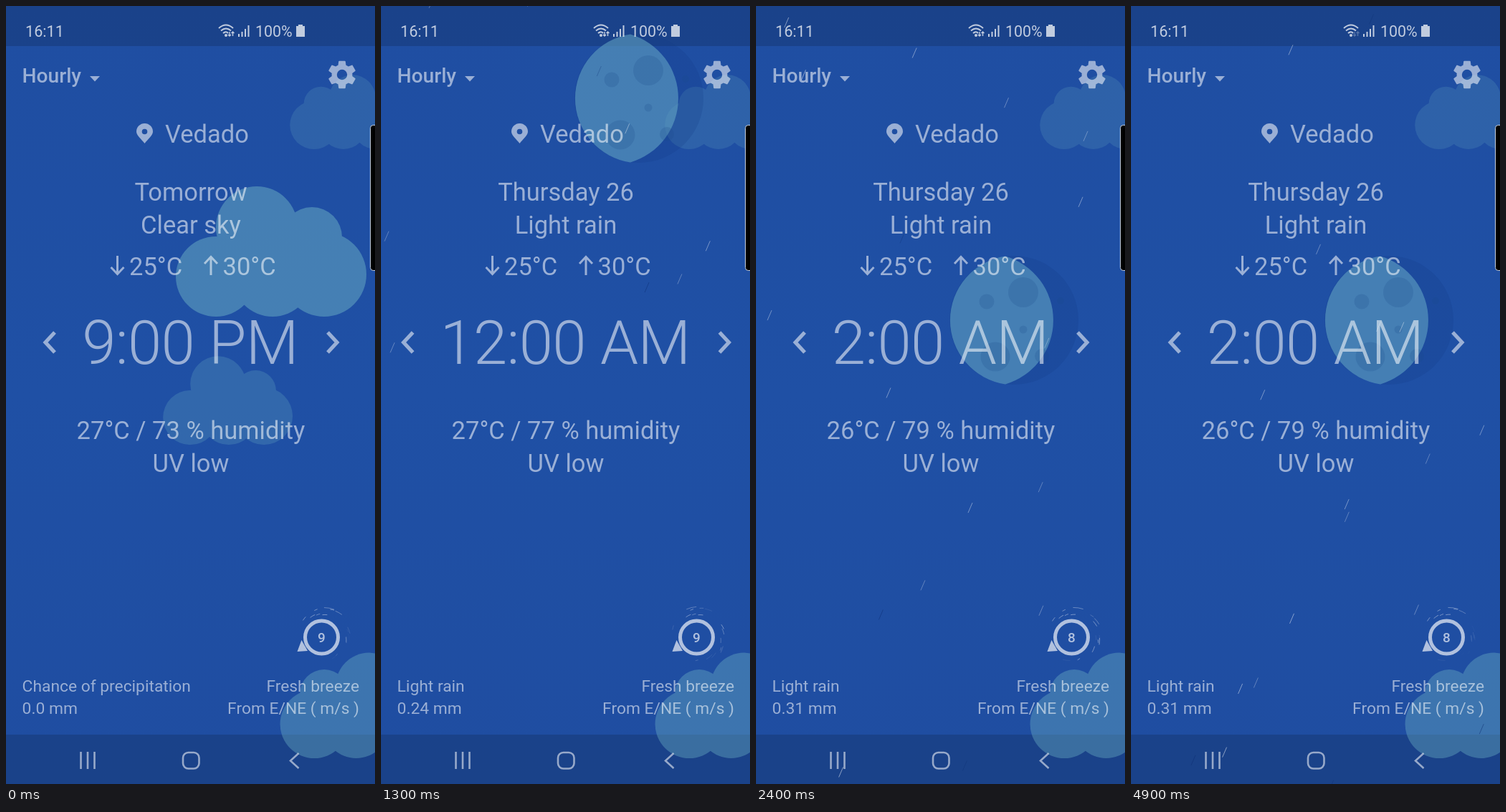
An HTML page for the animation above (5 s loop, 515x1087 px).

```html
<!DOCTYPE html>
<html lang="en">
<head>
<meta charset="utf-8">
<title>Hourly weather</title>
<style>
  html, body { margin: 0; width: 100%; height: 100%; overflow: hidden; background: #1f4fa3; }
  svg { display: block; width: 100%; height: 100%; }
  text { font-family: Roboto, sans-serif; fill: #fff; }
  .mid { text-anchor: middle; }
  .end { text-anchor: end; }
  .main { font-size: 34.5px; }
  .small { font-size: 22.8px; }
  .line { fill: none; stroke: #fff; }
  #clock { font-size: 85.2px; font-weight: 300; letter-spacing: -.7px; }
</style>
</head>
<body>
<svg viewBox="0 0 515 1087" preserveAspectRatio="none">
  <defs>
    <linearGradient id="sky" x2="0" y2="1">
      <stop stop-color="#1f4ea2"/>
      <stop offset=".5" stop-color="#1f50a5"/>
      <stop offset="1" stop-color="#1f4da1"/>
    </linearGradient>
    <g id="cloud" fill="#6cb0c4">
      <circle cx="293" cy="378" r="56"/>
      <circle cx="350" cy="309" r="57"/>
      <circle cx="427" cy="323" r="42"/>
      <circle cx="372" cy="378" r="56"/>
      <circle cx="444" cy="375" r="59"/>
    </g>
  </defs>

  <rect width="515" height="1087" fill="url(#sky)"/>
  <rect width="515" height="56" opacity=".15"/>
  <rect y="1018" width="515" height="69" opacity=".15"/>

  <g opacity=".2"><use href="#cloud" transform="translate(683 -47.4) scale(-.57 .57)"/></g>
  <g opacity=".4"><use href="#cloud" transform="translate(790 699.5) scale(-.81 .81)"/></g>
  <g id="bigCloud" opacity=".5"><use href="#cloud"/></g>
  <g id="smallCloud" opacity=".25"><use href="#cloud" transform="translate(58 318) scale(.68)"/></g>

  <g id="moon">
    <circle cx="360" r="90" fill="#123a80" opacity=".2"/>
    <path d="M348-89.5A90.5 90.5 0 0 0 348 89.5A93.3 93.3 0 0 0 348-89.5Z" fill="#6eb4cc" opacity=".5"/>
    <g fill="#1a4a8a" opacity=".2">
      <circle cx="373" cy="-39" r="21"/>
      <circle cx="322" cy="-26" r="10.5"/>
      <circle cx="373" cy="13" r="5.5"/>
      <circle cx="334" cy="51" r="20.5"/>
      <circle cx="399" cy="50" r="10"/>
      <circle cx="425" cy="-27" r="5"/>
    </g>
  </g>

  <g id="rain" stroke-width="1"></g>

  <g opacity=".73">
    <text x="27" y="43" font-size="21.6">16:11</text>
    <text x="348" y="43" font-size="21.4">100%</text>
    <path d="M408 26h6v2h3v15h-12v-15h3z" fill="#fff"/>
    <path class="line" stroke-width="2" d="M325 43v-4M329.5 43v-7M334 43v-11M338.5 43v-16"/>
    <path class="line" stroke-width="2" d="M297 31q10-9 20 0M300 34.5q7-6 14 0M303 38q4-3.5 7 0"/>
    <circle cx="307" cy="41" r="2" fill="#fff"/>
    <path id="traffic" class="line" stroke-width="1.4" d="M312 36v6m-2-2 2 2 2-2M316.5 42v-6m-2 2 2-2 2 2"/>
  </g>

  <g opacity=".55" fill="#fff">
    <text x="22.5" y="107" font-size="28.2" font-weight="500">Hourly</text>
    <path d="M117 98h14l-7 7.5z"/>
    <path transform="translate(445 72) scale(2)" fill-rule="evenodd" d="M19.14 12.94c.04-.3.06-.61.06-.94 0-.32-.02-.64-.07-.94l2.03-1.58c.18-.14.23-.41.12-.61l-1.92-3.32c-.12-.22-.37-.29-.59-.22l-2.39.96c-.5-.38-1.03-.7-1.62-.94l-.36-2.54c-.04-.24-.24-.41-.48-.41h-3.84c-.24 0-.43.17-.47.41l-.36 2.54c-.59.24-1.13.57-1.62.94l-2.39-.96c-.22-.08-.47 0-.59.22L2.74 8.87c-.12.21-.08.47.12.61l2.03 1.58c-.05.3-.09.63-.09.94s.02.64.07.94l-2.03 1.58c-.18.14-.23.41-.12.61l1.92 3.32c.12.22.37.29.59.22l2.39-.96c.5.38 1.03.7 1.62.94l.36 2.54c.05.24.24.41.48.41h3.84c.24 0 .44-.17.47-.41l.36-2.54c.59-.24 1.13-.56 1.62-.94l2.39.96c.22.08.47 0 .59-.22l1.92-3.32c.12-.22.07-.47-.12-.61zM12 15.6a3.6 3.6 0 1 1 0-7.2 3.6 3.6 0 0 1 0 7.2z"/>
    <path fill-rule="evenodd" d="M193.5 192C189 186 182 181 182 175.5a11.5 11.5 0 0 1 23 0C205 181 198 186 193.5 192zM189.7 175.5a3.8 3.8 0 0 0 7.6 0a3.8 3.8 0 0 0-7.6 0z"/>
    <g class="main">
      <text x="222" y="191">Vedado</text>
      <text id="day" class="mid" x="258" y="272"></text>
      <text id="outlook" class="mid" x="258" y="318"></text>
      <text x="172" y="376">25°C</text>
      <text x="302.5" y="376">30°C</text>
      <text id="air" class="mid" x="258" y="605"></text>
      <text class="mid" x="258" y="651">UV low</text>
    </g>
    <path class="line" stroke-width="3" d="M155.5 349v25m-9-9 9 9.5 9-9.5M286 376v-25m-9 9 9-9.5 9 9.5"/>
    <text id="clock" class="mid" x="257" y="500"></text>
    <path id="prev" class="line" stroke-width="5.2" d="M7-14-6 0 7 14"/>
    <path id="next" class="line" stroke-width="5.2" d="M-7-14 6 0-7 14"/>
    <g class="small">
      <text id="fall" x="22.6" y="958"></text>
      <text id="amount" x="22.6" y="989"></text>
      <text class="end" x="493" y="958">Fresh breeze</text>
      <text class="end" x="493" y="989">From E/NE ( m/s )</text>
    </g>
    <path class="line" stroke-width="2.6" d="M104.5 1042v24M114 1042v24M123.5 1042v24M408.5 1044l-11.5 10.5 11.5 10.5"/>
    <rect class="line" stroke-width="2.6" x="247" y="1043" width="22.5" height="22.5" rx="7.5"/>
  </g>

  <g opacity=".65">
    <circle class="line" cx="440.5" cy="882" r="23" stroke-width="5"/>
    <path d="M412.5 886 406.5 902 421 901z" fill="#fff"/>
    <text id="wind" class="mid" x="440.5" y="889" font-size="19" font-weight="500"></text>
  </g>
  <g id="gusts" class="line" stroke-width="1"></g>

  <rect x="508.5" y="166.5" width="14" height="203" rx="4" stroke="#c8d2e2"/>
</svg>

<script>
const LOOP = 5000, STEP = 100, RAIN_START = 850;
const $ = id => document.getElementById(id);

const hours = [
  { from: 0, clock: '9:00 PM', air: '27°C / 73', wind: 9 },
  { from: 400, clock: '10:00 PM', air: '27°C / 76', wind: 9 },
  { from: 800, clock: '11:00 PM', air: '27°C / 76', wind: 9 },
  { from: 1100, clock: '12:00 AM', air: '27°C / 77', wind: 9, mm: '0.24' },
  { from: 1500, clock: '1:00 AM', air: '27°C / 77', wind: 9, mm: '0.21' },
  { from: 2000, clock: '2:00 AM', air: '26°C / 79', wind: 8, mm: '0.31' }
];
const moonPath = [[200, 740], [700, 672], [1100, 85], [1300, 129], [1700, 268], [2200, 439]];

let seed = 17;
const rnd = (a = 0, b = 1) => {
  seed = (seed * 16807) % 2147483647;
  return a + (b - a) * seed / 2147483647;
};
const clamp = v => Math.max(0, Math.min(1, v));
const mod = (a, n) => ((a % n) + n) % n;

function add(parent, stroke) {
  const el = document.createElementNS('http://www.w3.org/2000/svg', 'path');
  el.setAttribute('stroke', stroke);
  return parent.appendChild(el);
}

const drops = Array.from({ length: 20 }, (_, i) => ({
  el: add($('rain'), i % 6 ? '#fff' : '#0c2c70'),
  x: rnd(0, 540), lead: rnd(0, 1150), speed: rnd(1.25, 1.5), alpha: rnd(.28, .5)
}));
const gusts = Array.from({ length: 16 }, () => ({
  el: add($('gusts'), '#fff'),
  r: rnd(31, 42), angle: rnd(-2.5, 1.4), span: rnd(.1, .35), life: rnd(), pace: Math.round(rnd(2, 5))
}));

function along(points, t) {
  const i = points.findIndex(p => p[0] > t);
  if (i === 0) return points[0][1];
  if (i < 0) return points[points.length - 1][1];
  const [t0, y0] = points[i - 1], [t1, y1] = points[i];
  return y0 + (y1 - y0) * (t - t0) / (t1 - t0);
}

function drawRain(t) {
  for (const d of drops) {
    const raw = d.speed * (t - RAIN_START) - d.lead;
    const y = raw < 0 ? raw : raw % 1150;
    const x = mod(d.x - y * .43, 540);
    d.el.setAttribute('d', `M${x} ${y}l-6 14`);
    d.el.setAttribute('opacity', raw < -20 ? 0 : d.alpha);
  }
}

function drawGusts(t) {
  for (const g of gusts) {
    const age = mod(g.life + g.pace * t / LOOP, 1);
    const a = g.angle + (age - .5) * .9, b = a + g.span;
    const at = (r, v) => `${440.5 + r * Math.cos(v)} ${882 + r * Math.sin(v)}`;
    g.el.setAttribute('d', `M${at(g.r, a)}A${g.r} ${g.r} 0 0 1 ${at(g.r + 1, b)}`);
    g.el.setAttribute('opacity', .4 * Math.sin(Math.PI * age));
  }
}

function drawLabels(t) {
  const h = hours.filter(h => h.from <= t).pop();
  const reach = h.clock.length > 7 ? 221 : 197.5;
  $('day').textContent = h.mm ? 'Thursday 26' : 'Tomorrow';
  $('outlook').textContent = h.mm ? 'Light rain' : 'Clear sky';
  $('clock').textContent = h.clock;
  $('air').textContent = h.air + ' % humidity';
  $('fall').textContent = h.mm ? 'Light rain' : 'Chance of precipitation';
  $('amount').textContent = (h.mm || '0.0') + ' mm';
  $('wind').textContent = h.wind;
  $('prev').setAttribute('transform', `translate(${258.5 - reach} 470)`);
  $('next').setAttribute('transform', `translate(${258.5 + reach} 470)`);
}

function draw(t) {
  const leave = clamp(t / 600) ** 2;
  $('bigCloud').setAttribute('transform', `translate(${leave * 285} 0)`);
  $('smallCloud').setAttribute('transform', `translate(${leave * -410} 0)`);
  $('moon').setAttribute('transform', `translate(0 ${along(moonPath, t)})`);
  $('moon').setAttribute('opacity', clamp((t - 200) / 400));
  $('traffic').setAttribute('opacity', t >= 4600 ? .35 : 1);
  drawLabels(t);
  drawRain(t);
  drawGusts(t);
}

const start = performance.now();
function tick() {
  const t = (performance.now() - start) % LOOP;
  draw(Math.floor(t / STEP) * STEP);
  requestAnimationFrame(tick);
}
tick();
</script>
</body>
</html>
```
